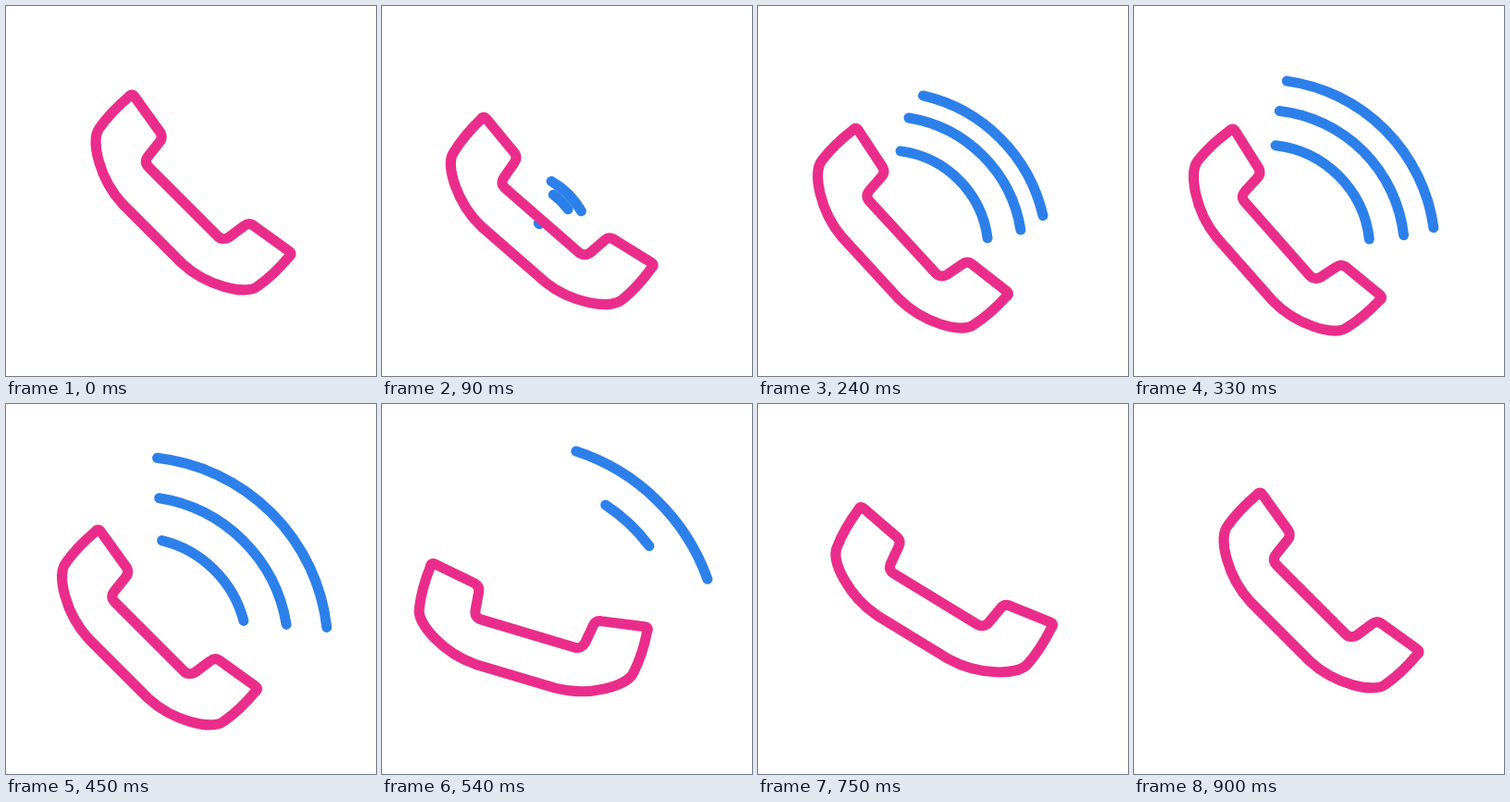
Write an HTML page that moves like this. It is 400x400 px and loops after 990 ms.

```html
<!DOCTYPE html>
<html lang="en">
<head>
<meta charset="utf-8">
<title>Ringing phone</title>
<style>
  html, body { margin: 0; width: 100%; height: 100%; overflow: hidden; background: #fff; }
  svg { display: block; width: 100%; height: 100%; }
  path { fill: none; stroke-width: 11; stroke-linecap: round; stroke-linejoin: round; }
  .wave { stroke: #2d80ea; }
  #phone { stroke: #ea2d8b; }
</style>
</head>
<body>
<svg viewBox="0 0 400 400">
  <path class="wave"/>
  <path class="wave"/>
  <path class="wave"/>
  <path id="phone" d="M139 98 L167 137 Q170 142 166 147 L154 162 C150 167 151 171 154.500 174.500
    L229 249 C232 252 237 252.500 241 250 L257 238 Q262 234 267 237 L306 265 Q310 268 306 271
    C296 283 282 296 272 303 C259 313 217 303 190 278 L126 214
    C101 187 91 145 101 132 C108 122 121 108 133 98 Q136 94 139 98 Z"/>
</svg>
<script>
const LOOP = 990, STEP = 30, END = 900;
const LIFT = 450;                    // the handset is picked up
const SWING = 575;                   // and tilted the most
const PIVOT = { x: 189, y: 209 };
const HUB = { x: 140, y: 265 };

const phone = document.getElementById("phone");
const lines = document.querySelectorAll(".wave");

// Outer to inner: radius, timing of opening, start of closing.
const waves = [
  { base: -10, grow: 190, drift: 45, open: 0, span: 405, shut: 455 },
  { base: -3, grow: 155, drift: 34, open: 62, span: 240, shut: 411 },
  { base: -34, grow: 149, drift: 24, open: 88, span: 180, shut: 383 }
];

const part = (t, from, span) => Math.max(0, Math.min(1, (t - from) / span));
const easeOut = u => 1 - (1 - u) ** 2;
const easeBoth = u => u * u * (3 - 2 * u);

function drawPhone(t) {
  const away = easeOut(part(t, 0, 300)) - easeBoth(part(t, 510, 225));
  const shake = -4 * Math.sin(2 * Math.PI * part(t, 0, 400));
  const swing = -30.8 * (easeOut(part(t, LIFT, SWING - LIFT)) - easeBoth(part(t, SWING, END - SWING)));
  phone.setAttribute("transform",
    `translate(${-36.5 * away} ${40 * away}) rotate(${shake + swing} ${PIVOT.x} ${PIVOT.y})`);
}

function polar(radius, degrees) {
  const a = degrees * Math.PI / 180;
  return (HUB.x + radius * Math.cos(a)).toFixed(2) + " " + (HUB.y + radius * Math.sin(a)).toFixed(2);
}

function drawWave(wave, i, t) {
  const shut = part(t, wave.shut, 150) ** 2;
  const half = 38.5 * easeOut(part(t, wave.open, wave.span)) * (1 - shut);
  lines[i].style.display = half > 0 ? "" : "none";
  const late = Math.max(0, (t - 300) / 240) ** (i + 1);
  const r = Math.max(1, wave.base + wave.grow * easeOut(part(t, 0, 300)) + wave.drift * late);
  const axis = -45 - 2.5 * shut;
  lines[i].setAttribute("d", `M${polar(r, axis - half)} A${r} ${r} 0 0 1 ${polar(r, axis + half)}`);
}

function draw(time) {
  const t = Math.min(Math.floor((time % LOOP) / STEP) * STEP, END);
  drawPhone(t);
  waves.forEach((wave, i) => drawWave(wave, i, t));
}

const start = performance.now();
function tick() {
  draw(performance.now() - start);
  requestAnimationFrame(tick);
}
tick();
</script>
</body>
</html>
```
